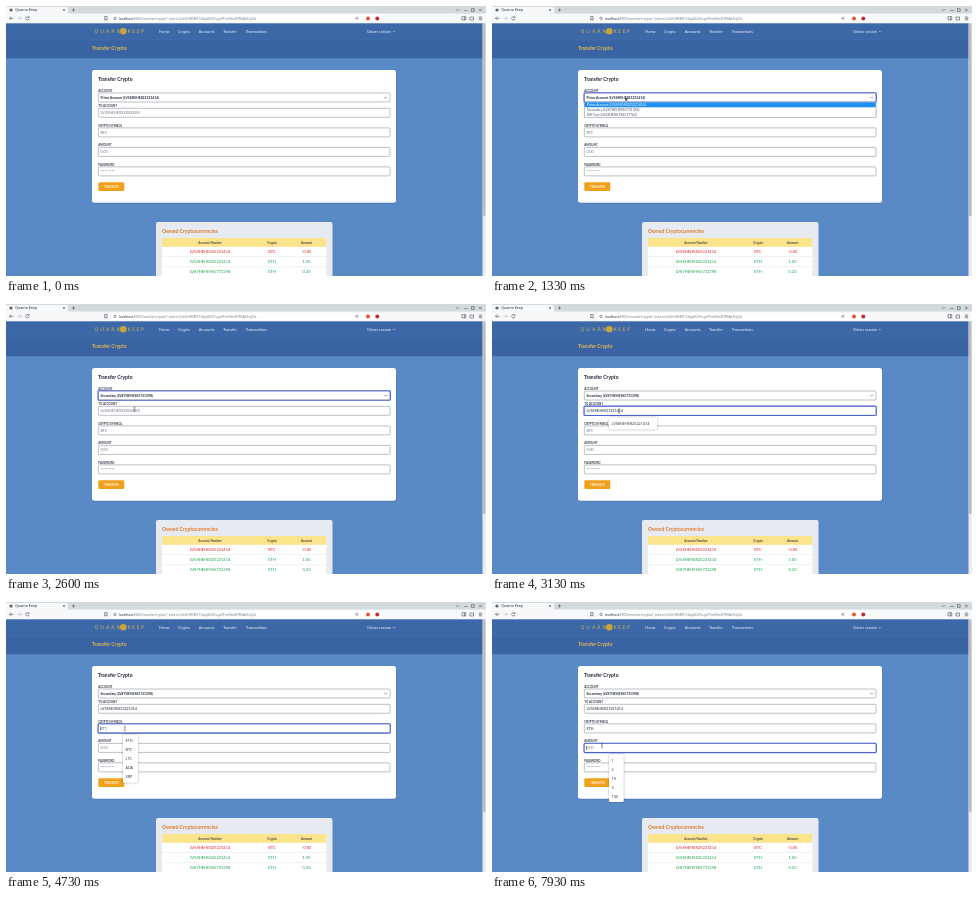
Recreate the animation shown at these times as an HTML page. Size 480 by 270 pixels, loop 8 s.

```html
<!DOCTYPE html>
<html lang="en">
<head>
<meta charset="utf-8">
<title>Quarno Keep</title>
<style>
html, body { margin: 0; width: 100%; height: 100%; overflow: hidden; background: #5a8ac6; }
svg { display: block; width: 480px; height: 270px; }
text { font: 3.6px Lato, sans-serif; fill: #1f2937; white-space: pre; }
.chrome text { font: 3.5px "Noto Sans", sans-serif; }
.icon { fill: none; stroke: #4b5057; stroke-width: .6; }
.logo text { font: 5px "DejaVu Sans", sans-serif; fill: #c8ae5a; letter-spacing: 1.9px; }
.nav text { font-size: 3.9px; fill: #eef2f8; }
.head { font-weight: 700; font-size: 5px; }
.label text { font-size: 2.9px; font-weight: 700; fill: #303744; }
.bold { font-weight: 700; font-size: 3.35px; }
.hint { fill: #6b7280; }
.field { fill: #fff; stroke: #858b95; stroke-width: .55; }
.ring { fill: none; stroke: #4c63d2; stroke-width: 1.1; }
.menu text { font-size: 3.4px; fill: #4b5563; }
.menu .hot text { fill: #fff; }
.hot rect { fill: #1e8ff0; }
.pop { filter: drop-shadow(0 .5px .8px #0005); }
.pop text { font: 3.8px "Noto Sans", sans-serif; fill: #30343a; }
.caret { stroke: #111; stroke-width: .5; }
.mid text { text-anchor: middle; }
.thead text { font-size: 3.1px; font-weight: 700; fill: #4b4a3c; }
.row text { font-size: 4px; fill: #16a34a; }
.row.loss text { fill: #dc2626; }

/* One loop is 8 s, so 1% is 80 ms */
.s { animation: 8s step-end infinite; }
.prime { animation-name: prime; }
.second { animation-name: second; }
.menu { animation-name: menu; }
.hot1 { animation-name: hot1; }
.hot2 { animation-name: hot2; }
.ring1 { animation-name: ring1; }
.ring2 { animation-name: ring2; }
.ring3 { animation-name: ring3; }
.ring4 { animation-name: ring4; }
.to-hint { animation-name: to-hint; }
.to-text { animation-name: to-text; }
.to-pop { animation-name: to-pop; }
.spell { animation-name: spell; }
.coin-hint { animation-name: coin-hint; }
.coin-pop { animation-name: coin-pop; }
.key1 { animation-name: key1; }
.key2 { animation-name: key2; }
.key3 { animation-name: key3; }
.coin-caret { animation-name: coin-caret, caret-move; }
.arrow { animation-name: arrow; }
.beam { animation-name: beam; }
.cursor { animation: path 8s linear infinite; }

@keyframes prime { 0% { visibility: visible } 27.5%, 100% { visibility: hidden } }
@keyframes second { 0% { visibility: hidden } 27.5%, 100% { visibility: visible } }
@keyframes menu { 0% { visibility: hidden } 15.875% { visibility: visible } 27.5%, 100% { visibility: hidden } }
@keyframes hot1 { 0% { visibility: hidden } 15.875% { visibility: visible } 23.375%, 100% { visibility: hidden } }
@keyframes hot2 { 0% { visibility: hidden } 23.375% { visibility: visible } 27.5%, 100% { visibility: hidden } }
@keyframes ring1 { 0% { visibility: hidden } 15.875% { visibility: visible } 34.125%, 100% { visibility: hidden } }
@keyframes ring2 { 0% { visibility: hidden } 34.125% { visibility: visible } 54.125%, 100% { visibility: hidden } }
@keyframes ring3 { 0% { visibility: hidden } 54.125% { visibility: visible } 94.125%, 100% { visibility: hidden } }
@keyframes ring4 { 0% { visibility: hidden } 94.125%, 100% { visibility: visible } }
@keyframes to-hint { 0% { visibility: visible } 37.5%, 100% { visibility: hidden } }
@keyframes to-text { 0% { visibility: hidden } 37.5%, 100% { visibility: visible } }
@keyframes to-pop { 0% { visibility: hidden } 34.125% { visibility: visible } 41.625%, 100% { visibility: hidden } }
@keyframes spell { 0% { visibility: hidden } 41.625% { visibility: visible } 54.125%, 100% { visibility: hidden } }
@keyframes coin-hint { 0% { visibility: visible } 70.875%, 100% { visibility: hidden } }
@keyframes coin-pop { 0% { visibility: hidden } 55.875% { visibility: visible } 70.875%, 100% { visibility: hidden } }
@keyframes key1 { 0% { visibility: hidden } 70.875%, 100% { visibility: visible } }
@keyframes key2 { 0% { visibility: hidden } 74.125%, 100% { visibility: visible } }
@keyframes key3 { 0% { visibility: hidden } 75.875%, 100% { visibility: visible } }
@keyframes coin-caret {
  0% { visibility: hidden } 54.125% { visibility: visible } 62.5% { visibility: hidden }
  65% { visibility: visible } 82.5% { visibility: hidden } 88.75% { visibility: visible }
  94.125%, 100% { visibility: hidden }
}
@keyframes caret-move {
  0% { transform: none } 70.875% { transform: translateX(2.2px) }
  74.125% { transform: translateX(4.4px) } 75.875%, 100% { transform: translateX(7.2px) }
}
@keyframes arrow {
  0% { visibility: hidden } .875% { visibility: visible } 32.5% { visibility: hidden }
  44% { visibility: visible } 52.5% { visibility: hidden } 88.75% { visibility: visible }
  90.75%, 100% { visibility: hidden }
}
@keyframes beam {
  0% { visibility: hidden } 32.5% { visibility: visible } 44% { visibility: hidden }
  52.5% { visibility: visible } 88.75% { visibility: hidden } 90.75%, 100% { visibility: visible }
}
@keyframes path {
  0%, .875% { transform: translate(33px, 12px); animation-timing-function: ease-in-out }
  10.875% { transform: translate(134px, 92px) }
  14.125%, 16.625% { transform: translate(133px, 90.5px) }
  25.875%, 30.875% { transform: translate(131px, 101.5px) }
  33.375%, 41.625% { transform: translate(127px, 107px); animation-timing-function: ease-in-out }
  50.875% { transform: translate(119.5px, 121.5px) }
  52.5%, 87.5% { transform: translate(118.7px, 126.5px); animation-timing-function: ease-in-out }
  91.625%, 100% { transform: translate(110px, 143.5px) }
}
</style>
</head>
<body>
<svg viewBox="0 0 480 270">
  <rect width="480" height="270" fill="#5a8ac6"/>

  <g class="chrome">
    <rect width="480" height="8" fill="#d3dadd"/>
    <path d="M0 8V1h60q2 0 2 2v5z" fill="#f7f8f9"/>
    <rect y="7.5" width="480" height="10" fill="#f7f8f9"/>
    <rect x="106" y="8.8" width="270" height="7.2" rx="1" fill="#fff"/>
    <circle cx="5" cy="4" r="1.6" fill="#5f6368"/>
    <text x="9.3" y="5.3">Quarno Keep</text>
    <text x="113" y="13.6" style="font-size:3.3px">localhost<tspan fill="#777c82">:8000/transfer/crypto?_token=JUt3rHWiM17tIqqGDLPugoFFmHifo4FWSAkFqQ2s</tspan></text>
    <path class="icon" d="M57 3l2 2m0-2l-2 2M66 4h3m-1.5-1.5v3M450 3.3l1.5 1.5 1.5-1.5M458.500 4.500h3M465.500 2.700h2.700v2.700h-2.700zM473 2.700l2.700 2.700m0-2.700l-2.700 2.700"/>
    <path class="icon" d="M7.500 12.300h-4m1.600-1.600l-1.600 1.600 1.600 1.600M22.800 11.300a1.700 1.700 0 1 0 .2 1.600m0-2.500v1.300h-1.300M98.700 10.500h2.400v3.700l-1.200-1-1.200 1z"/>
    <path class="icon" stroke="#b0b4b8" style="stroke:#b0b4b8" d="M11.500 12.300h4m-1.600-1.600l1.600 1.600-1.600 1.600"/>
    <circle cx="109" cy="12.400" r="1.200" class="icon"/>
    <path class="icon" d="M352.200 11l-2.700 1.300 2.700 1.300M456 10.700h3.800v3.200h-3.800zM458.500 10.700v3.200M464 11h3.500v3h-3.500zM472.800 11h3.400m-3.400 1.400h3.400m-3.400 1.400h3.400"/>
    <circle cx="362" cy="12.400" r="2" fill="#e8532c"/>
    <circle cx="371.300" cy="12.400" r="2" fill="#c62835"/>
  </g>

  <rect y="17.500" width="477" height="16.500" fill="#3d68a8"/>
  <rect y="34" width="477" height="18" fill="#3963a2"/>
  <rect y="33.800" width="477" height=".4" fill="#4b75b2"/>
  <rect y="52" width="477" height="1" fill="#5080bb"/>
  <rect x="476.500" y="17.500" width="3.500" height="252.500" fill="#e9ebed"/>
  <rect x="477" y="18" width="2.500" height="192" rx="1" fill="#b9bdc1"/>

  <g class="logo">
    <text x="88.500" y="27">QUARN</text>
    <text x="121.500" y="27" style="letter-spacing:1.300px">KEEP</text>
    <circle cx="117.300" cy="25.300" r="3.300" fill="#c9a53a"/>
  </g>
  <g class="nav">
    <text x="153.300" y="26.700">Home</text>
    <text x="172" y="26.700">Crypto</text>
    <text x="192.700" y="26.700">Accounts</text>
    <text x="217" y="26.700">Transfer</text>
    <text x="239.700" y="26.700">Transactions</text>
    <text x="361" y="26.700" style="font-size:3.700px">Oskars session</text>
    <path d="M387 24.900l1.200 1.200 1.200-1.200" fill="none" stroke="#dce5f2" stroke-width=".5"/>
  </g>
  <text class="head" x="86" y="44.300" style="fill:#e6b84a">Transfer Crypto</text>

  <rect x="86" y="64.700" width="304.500" height="133" rx="2.500" fill="#3c659b" opacity=".35"/>
  <rect x="86" y="64" width="304" height="132.700" rx="2.500" fill="#fff"/>
  <text class="head" x="92" y="74.800">Transfer Crypto</text>
  <g class="label">
    <text x="92.300" y="85.600">ACCOUNT</text>
    <text x="92.300" y="101.100">TO ACCOUNT</text>
    <text x="92.300" y="120.600">CRYPTO SYMBOL</text>
    <text x="92.300" y="140.200">AMOUNT</text>
    <text x="92.300" y="159.700">PASSWORD</text>
  </g>
  <rect class="field" x="92.300" y="87" width="291.700" height="9" rx="1"/>
  <rect class="field" x="92.300" y="102.300" width="291.700" height="9" rx="1"/>
  <rect class="field" x="92.300" y="121.900" width="291.700" height="9" rx="1"/>
  <rect class="field" x="92.300" y="141.400" width="291.700" height="9" rx="1"/>
  <rect class="field" x="92.300" y="160.900" width="291.700" height="9" rx="1"/>
  <path class="icon" d="M378.300 90.900l1.300 1.300 1.300-1.300"/>

  <text class="bold s prime" x="94.500" y="92.700">Prime Account (LV58HEHE825221414)</text>
  <text class="bold s second" x="94.500" y="92.700">Secondary (LV87HEHE965731398)</text>
  <text class="hint s to-hint" x="94.500" y="108.100">LVXXHEHEXXXXXXXXX</text>
  <text class="s to-text" x="94.500" y="108.100">LV58HEHE825221414</text>
  <path class="s spell" d="M94.500 109.100h37" stroke="#d9607a" stroke-width=".5"/>
  <text class="hint s coin-hint" x="94.500" y="127.700">BTC</text>
  <text x="94.500" y="127.700"><tspan class="s key1">E</tspan><tspan class="s key2">T</tspan><tspan class="s key3">H</tspan></text>
  <text class="hint" x="94.500" y="147.200">0.00</text>
  <text class="hint" x="94.500" y="167.300" style="font-size:3.300px">**********</text>

  <rect x="92.300" y="176.200" width="26" height="8.700" rx="1.200" fill="#f0a01c"/>
  <text x="105.300" y="181.700" text-anchor="middle" style="font-size:2.900px;font-weight:700;fill:#fff6df">TRANSFER</text>

  <rect class="ring s ring1" x="92" y="86.800" width="292.300" height="9.400" rx="1"/>
  <rect class="ring s ring2" x="92" y="102.100" width="292.300" height="9.400" rx="1"/>
  <rect class="ring s ring3" x="92" y="121.700" width="292.300" height="9.400" rx="1"/>
  <rect class="ring s ring4" x="92" y="141.200" width="292.300" height="9.400" rx="1"/>
  <path class="caret s coin-caret" d="M94.700 124.300v4.300"/>
  <path class="caret s ring4" d="M94.600 143.800v4.300"/>

  <g class="mid">
    <path d="M150 270v-52q0-2 2-2h172.500q2 0 2 2v52z" fill="#e7eaf0"/>
    <rect x="156" y="232" width="164.300" height="38" fill="#fff"/>
    <rect x="156" y="232" width="164.300" height="8.800" fill="#fbe48c"/>
    <path d="M156 250.500h164.300M156 260.700h164.300" stroke="#e3e5e9" stroke-width=".5"/>
    <g class="thead">
      <text x="204" y="237.600">Account Number</text>
      <text x="266" y="237.600">Crypto</text>
      <text x="300.500" y="237.600">Amount</text>
    </g>
    <g class="row loss">
      <text x="204" y="247">LV58HEHE825221414</text>
      <text x="266" y="247">BTC</text>
      <text x="300.500" y="247">-0.80</text>
    </g>
    <g class="row">
      <text x="204" y="257.200">LV58HEHE825221414</text>
      <text x="266" y="257.200">ETH</text>
      <text x="300.500" y="257.200">1.00</text>
      <text x="204" y="267.400">LV87HEHE965731398</text>
      <text x="266" y="267.400">ETH</text>
      <text x="300.500" y="267.400">0.20</text>
    </g>
  </g>
  <text class="head" x="156" y="227.300" style="fill:#de7a2c">Owned Cryptocurrencies</text>

  <g class="menu s">
    <rect x="92.300" y="96.100" width="291.700" height="15.600" fill="#fff" stroke="#8d949e" stroke-width=".5"/>
    <text x="94.800" y="100">Prime Account (LV58HEHE825221414)</text>
    <text x="94.800" y="105.100">Secondary (LV87HEHE965731398)</text>
    <text x="94.800" y="110.200">Diff Curr (LV42HEHE196517762)</text>
    <g class="hot s hot1">
      <rect x="92.500" y="96.300" width="291.300" height="5"/>
      <text x="94.800" y="100">Prime Account (LV58HEHE825221414)</text>
    </g>
    <g class="hot s hot2">
      <rect x="92.500" y="101.300" width="291.300" height="5.200"/>
      <text x="94.800" y="105.100">Secondary (LV87HEHE965731398)</text>
    </g>
  </g>

  <g class="pop s to-pop">
    <rect x="117" y="113.300" width="48" height="12.300" rx="1" fill="#fff"/>
    <text x="119.500" y="120.800">LV58HEHE825221414</text>
  </g>
  <g class="pop s coin-pop">
    <rect x="117" y="132.800" width="15" height="48" rx="1" fill="#fff"/>
    <text x="119.500" y="140.300">ETH</text>
    <text x="119.500" y="149.300">BTC</text>
    <text x="119.500" y="158.300">LTC</text>
    <text x="119.500" y="167.300">ADA</text>
    <text x="119.500" y="176.300">XRP</text>
  </g>
  <g class="pop s ring4">
    <rect x="117" y="152.200" width="14.700" height="47.800" rx="1" fill="#fff"/>
    <text x="119.500" y="159.800">1</text>
    <text x="119.500" y="168.800">2</text>
    <text x="119.500" y="177.800">10</text>
    <text x="119.500" y="186.800">3</text>
    <text x="119.500" y="195.800">100</text>
  </g>

  <g class="cursor">
    <path class="s arrow" d="M0 0v4.300l1-.9.700 1.600.7-.3-.7-1.500h1.400z" fill="#111" stroke="#fff" stroke-width=".3"/>
    <path class="s beam" d="M-.8-2h1.600M0-2v4M-.8 2h1.600" fill="none" stroke="#222" stroke-width=".5"/>
  </g>
</svg>
</body>
</html>
```
